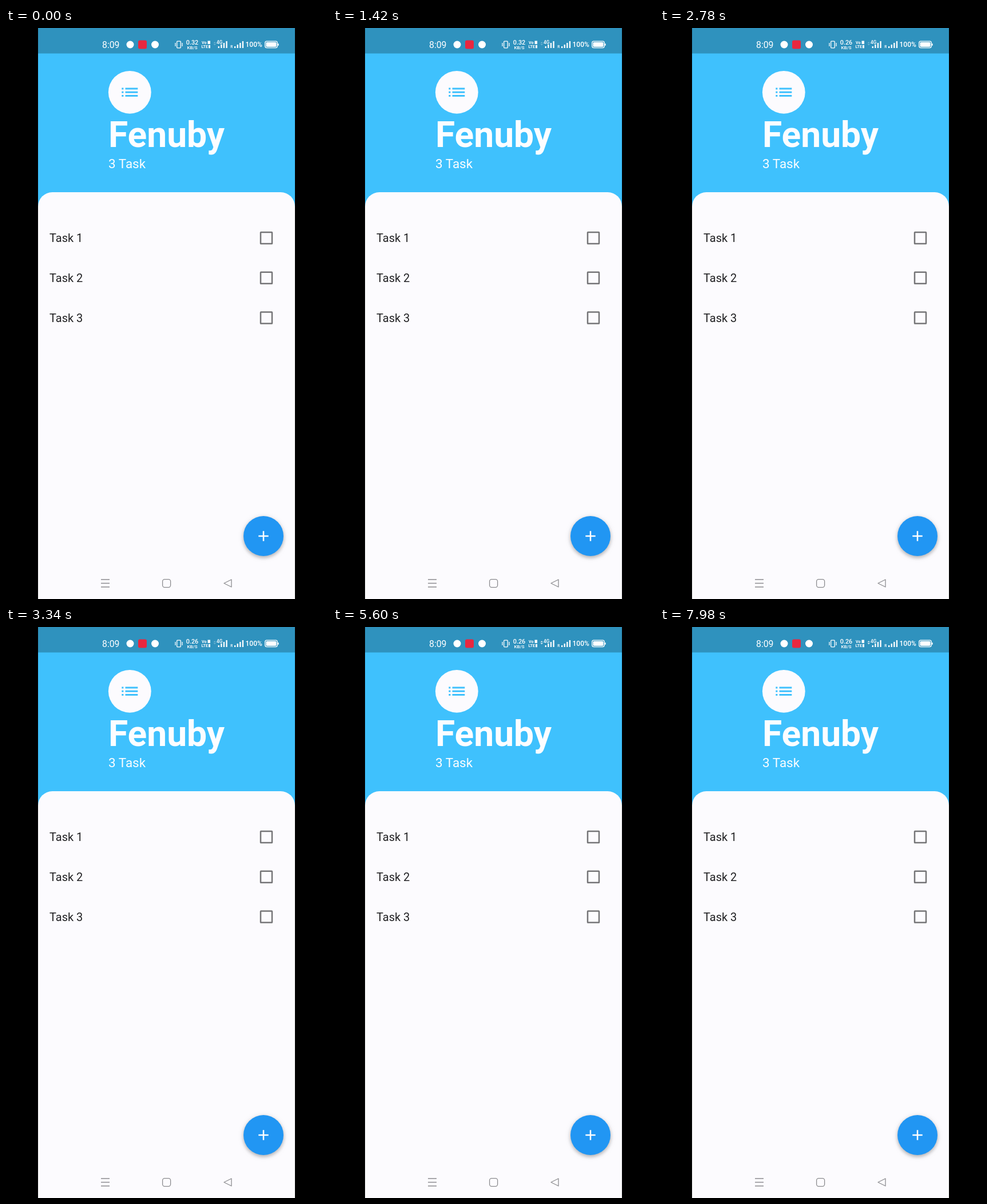
Write an HTML page that moves like this. It is 561 px wide and 998 px high and loops after 8 s.

```html
<!DOCTYPE html>
<html lang="en">
<head>
<meta charset="utf-8">
<title>Task list</title>
<style>
  html, body { margin: 0; width: 100%; height: 100%; overflow: hidden; background: #000; }
  svg { display: block; width: 561px; height: 998px; font-family: Roboto, sans-serif; }
  .fab { filter: drop-shadow(0 3px 3px rgba(0, 0, 0, .24)) drop-shadow(0 1px 5px rgba(0, 0, 0, .1)); }
  .line { fill: none; stroke: #8b8b8f; stroke-width: 1.3; }
  .thin { fill: none; stroke: #fff; stroke-width: 1.3; }
</style>
</head>
<body>
<svg viewBox="0 0 561 998">
  <rect width="561" height="998" fill="#000"/>
  <rect x="56" width="449" height="400" fill="#3fc1fd"/>
  <rect x="56" width="449" height="44.5" fill="#2f92be"/>
  <path d="M56 998V312a25 25 0 0 1 25-25H480a25 25 0 0 1 25 25V998z" fill="#fcfbfe"/>

  <g id="status" fill="#fff">
    <text x="168" y="34.5" font-size="15.8">8:09</text>
    <circle cx="217" cy="29" r="6.5"/>
    <rect x="231" y="21.5" width="15" height="15" rx="3" fill="#e9273f"/>
    <circle cx="260.5" cy="29" r="6.5"/>

    <rect class="thin" x="298.7" y="23.2" width="6.6" height="11.6" rx="1"/>
    <path class="thin" d="M296 26v6M308 26v6"/>

    <g text-anchor="middle" font-weight="500">
      <text id="speed" x="325.5" y="29" font-size="10.8">0.32</text>
      <text x="325.5" y="37" font-size="8">KB/S</text>
    </g>
    <g font-weight="700" font-size="7">
      <text x="342" y="28">Vo</text>
      <text x="341.5" y="35.3">LTE</text>
    </g>
    <path d="M352.5 22.5h4.5v5.5h-4.5zM354 29.7h3v5.6h-3z"/>
    <path id="arrows" d="M362.5 26.5l2.2-2.3 2.3 2.3zM362.5 28l2.2 2.3 2.3-2.3z"/>
    <text x="368" y="28.3" font-size="8.2" font-weight="500">4G</text>
    <text x="392.2" y="35" font-size="6.5" font-weight="500">R</text>
    <text x="418.5" y="33" font-size="12" font-weight="500">100%</text>
    <rect class="thin" x="452.7" y="23.2" width="21.6" height="11.4" rx="3"/>
    <rect x="454.4" y="24.8" width="18.2" height="8.2" rx="1.8"/>
    <rect x="475" y="27" width="1.6" height="4" rx=".8"/>
  </g>

  <circle cx="216.3" cy="112.3" r="37.4" fill="#fcfbfe"/>
  <path fill="#3fc1fd" transform="translate(197.6 93.6) scale(1.558)"
    d="M3 7h2v2H3zM7 7h14v2H7zM3 11h2v2H3zM7 11h14v2H7zM3 15h2v2H3zM7 15h14v2H7z"/>
  <g fill="#fcfdff">
    <text x="179" y="208" font-size="62.35" font-weight="700">Fenuby</text>
    <text x="179" y="245" font-size="22.45">3 Task</text>
  </g>

  <g id="tasks" font-size="19.95" fill="#212123"></g>

  <circle class="fab" cx="450" cy="888" r="35" fill="#2196f3"/>
  <path d="M441.3 888h17.4M450 879.3v17.4" stroke="#fff" stroke-width="2.5"/>

  <g class="line">
    <path d="M166 964h15M166 970.5h15M166 977h15"/>
    <rect x="273.6" y="963.6" width="14" height="14" rx="3.5"/>
    <path d="M381 970.5L394 964V977z" stroke-linejoin="round"/>
  </g>
</svg>
<script>
const LOOP = 8000, SPEED_CHANGE = 2500, ARROWS_ON = 4180;
const find = id => document.getElementById(id);

function add(parent, tag, attrs, text = '') {
  const el = document.createElementNS(parent.namespaceURI, tag);
  for (const [key, value] of Object.entries(attrs)) el.setAttribute(key, value);
  el.textContent = text;
  parent.append(el);
}

for (let i = 0; i < 3; i++) {
  const y = 367 + i * 69.8;
  add(find('tasks'), 'text', { x: 76, y: y + 7 }, `Task ${i + 1}`);
  add(find('tasks'), 'rect', {
    x: 445, y: y - 10, width: 20, height: 20, rx: .6,
    fill: 'none', stroke: '#757577', 'stroke-width': 2.5
  });
}

// Signal meters: four bars growing by a constant step
for (const left of [370.6, 399]) {
  for (let i = 0; i < 4; i++) {
    const height = 3 + i * 3;
    add(find('status'), 'rect', { x: left + i * 4.6, y: 35 - height, width: 2.3, height });
  }
}

const start = performance.now();
function draw(now) {
  const t = Math.max(0, now - start) % LOOP;
  find('speed').textContent = t < SPEED_CHANGE ? '0.32' : '0.26';
  find('arrows').setAttribute('opacity', t < ARROWS_ON ? .3 : .85);
  requestAnimationFrame(draw);
}
draw(start);
</script>
</body>
</html>
```
